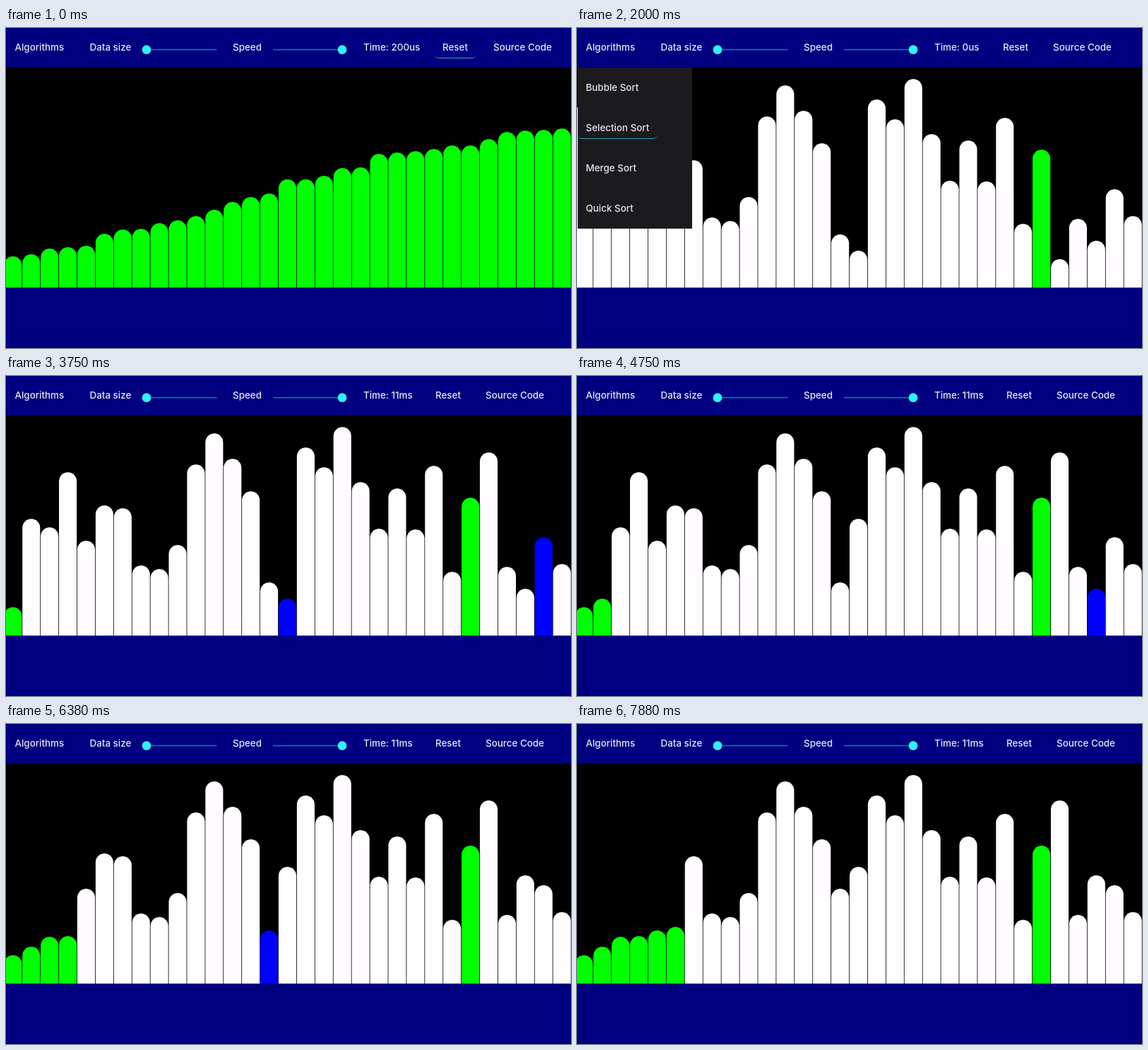
Recreate the animation shown at these times as an HTML page with a canvas. Size 800x453 px, loop 8000 ms.

```html
<!DOCTYPE html>
<html lang="en">
<head>
<meta charset="utf-8">
<title>Sorting visualizer</title>
<style>
html, body { margin: 0; width: 100%; height: 100%; overflow: hidden; background: #000080; }
#stage { position: relative; width: 800px; height: 453px; overflow: hidden; }
canvas { position: absolute; left: 0; top: 0; }
#menu { position: absolute; left: 1px; top: 56px; width: 162px; height: 228px; background: #1b1a1c; }
.link {
  position: absolute; height: 30px; padding: 0 11px; white-space: pre;
  font: 500 13.4px/30px Inter, "Open Sans", sans-serif; color: #e6e6f2;
  border-bottom: 1px solid transparent; border-radius: 5px;
}
.link.on { border-bottom-color: #3fa3b4; }
</style>
</head>
<body>
<div id="stage">
  <canvas id="view" width="800" height="453"></canvas>
  <div id="menu"></div>
</div>
<script>
const LOOP = 8000, TICK = 125;
const COUNT = 40, SHOWN = 31, PITCH = 25.91, LEFT = -3.1, HEADER = 55.6, FLOOR = 367.4;
const RESET_AT = 500, SORT_AT = 2293, STEP = 21, SWAP = 60;
const MENU_OPEN = 1250, MENU_CLOSE = 2625;
const WHITE = '#fffdff', GREEN = '#00ff00', BLUE = '#0000ff', RED = '#ff0000';
const KEPT_GREEN = 25;

// Bar tops in px; the bars past SHOWN lie beyond the right edge.
const sorted = [323, 320, 312, 310, 308, 291, 285, 284, 276, 272, 266, 257, 246, 239, 234, 214,
  214, 209, 198, 197, 178, 176, 174, 171, 166, 166, 157, 147, 145, 144, 142];
const shuffled = [108, 202, 214, 136, 233, 183, 187, 268, 273, 239, 125, 81, 117, 163, 292, 315,
  101, 129, 72, 150, 216, 159, 217, 127, 277, 172, 327, 270, 301, 228, 266,
  190, 300, 95, 160, 282, 210, 287, 140, 180];

const stage = document.getElementById('stage');
const menu = document.getElementById('menu');
const ctx = document.getElementById('view').getContext('2d');

function link(text, x, y, parent = stage) {
  const el = document.createElement('span');
  el.className = 'link';
  el.textContent = text;
  el.style.left = x - 11 + 'px';
  el.style.top = y - 15 + 'px';
  parent.appendChild(el);
  return el;
}

const algorithms = link('Algorithms', 12.5, 27);
link('Data size', 118.5, 27);
link('Speed', 321, 27);
const clock = link('', 506, 27);
const reset = link('Reset', 618, 27);
const source = link('Source Code', 690, 27);
const items = ['Bubble Sort', 'Selection Sort', 'Merge Sort', 'Quick Sort']
  .map((name, i) => link(name, 11.5, 28 + 57 * i, menu));

// Selection sort replayed up to the given time.
function sortState(time) {
  const tops = shuffled.slice();
  const colors = tops.map((_, i) => i === KEPT_GREEN ? GREEN : WHITE);
  let left = time - SORT_AT;
  for (let i = 0; i < COUNT - 1 && left >= 0; i++) {
    const scan = (COUNT - 1 - i) * STEP;
    const done = left >= scan;
    const last = done ? COUNT - 1 : i + 1 + Math.floor(left / STEP);
    let min = i;
    for (let j = i + 1; j <= last; j++) if (tops[j] > tops[min]) min = j;
    if (!done) {
      if (min !== i) colors[min] = BLUE;
      colors[last] = BLUE;
      break;
    }
    [tops[i], tops[min]] = [tops[min], tops[i]];
    colors[i] = GREEN;
    left -= scan + SWAP;
    if (left < 0 && min !== i) colors[min] = RED;
  }
  return { tops, colors };
}

function bar(i, top, color) {
  const x = LEFT + i * PITCH + 0.4, y = top + 0.3, w = PITCH - 0.8, r = w / 2;
  ctx.fillStyle = color;
  ctx.beginPath();
  ctx.moveTo(x, FLOOR);
  ctx.lineTo(x, y + r);
  ctx.arc(x + r, y + r, r, Math.PI, 0);
  ctx.lineTo(x + w, FLOOR);
  ctx.fill();
}

function slider(x1, x2, knob) {
  ctx.fillStyle = '#087f95';
  ctx.fillRect(x1, 29.8, x2 - x1, 1.6);
  ctx.fillStyle = '#2cf3ff';
  ctx.beginPath();
  ctx.arc(knob, 30.7, 6.4, 0, Math.PI * 2);
  ctx.fill();
}

function place(text, resetX, sourceX) {
  clock.textContent = text;
  reset.style.left = resetX - 11 + 'px';
  source.style.left = sourceX - 11 + 'px';
}

function draw(time) {
  ctx.fillStyle = '#000080';
  ctx.fillRect(0, 0, 800, 453);
  ctx.fillStyle = '#000';
  ctx.fillRect(0, HEADER, 800, FLOOR - HEADER);
  slider(194, 298.5, 199);
  slider(378, 481, 476);

  const fresh = time >= RESET_AT;
  const state = fresh ? sortState(time) : { tops: sorted, colors: sorted.map(() => GREEN) };
  for (let i = 0; i < SHOWN; i++) bar(i, state.tops[i], state.colors[i]);

  if (!fresh) place('Time: 200us', 618, 690);
  else if (time < SORT_AT - TICK) place('Time: 0us', 603, 674);
  else place('Time: 11ms', 608, 679);

  const within = (from, to) => time >= from && time < to;
  menu.style.display = within(MENU_OPEN, MENU_CLOSE) ? 'block' : 'none';
  reset.classList.toggle('on', time < 750);
  algorithms.classList.toggle('on', within(MENU_OPEN, 1500));
  items[0].classList.toggle('on', within(1500, 1750));
  items[1].classList.toggle('on', within(1750, MENU_CLOSE));
}

let shown = -1;
function frame() {
  const tick = Math.floor(((performance.now() + 3) % LOOP) / TICK);
  if (tick !== shown) draw((shown = tick) * TICK);
  requestAnimationFrame(frame);
}
frame();
</script>
</body>
</html>
```
